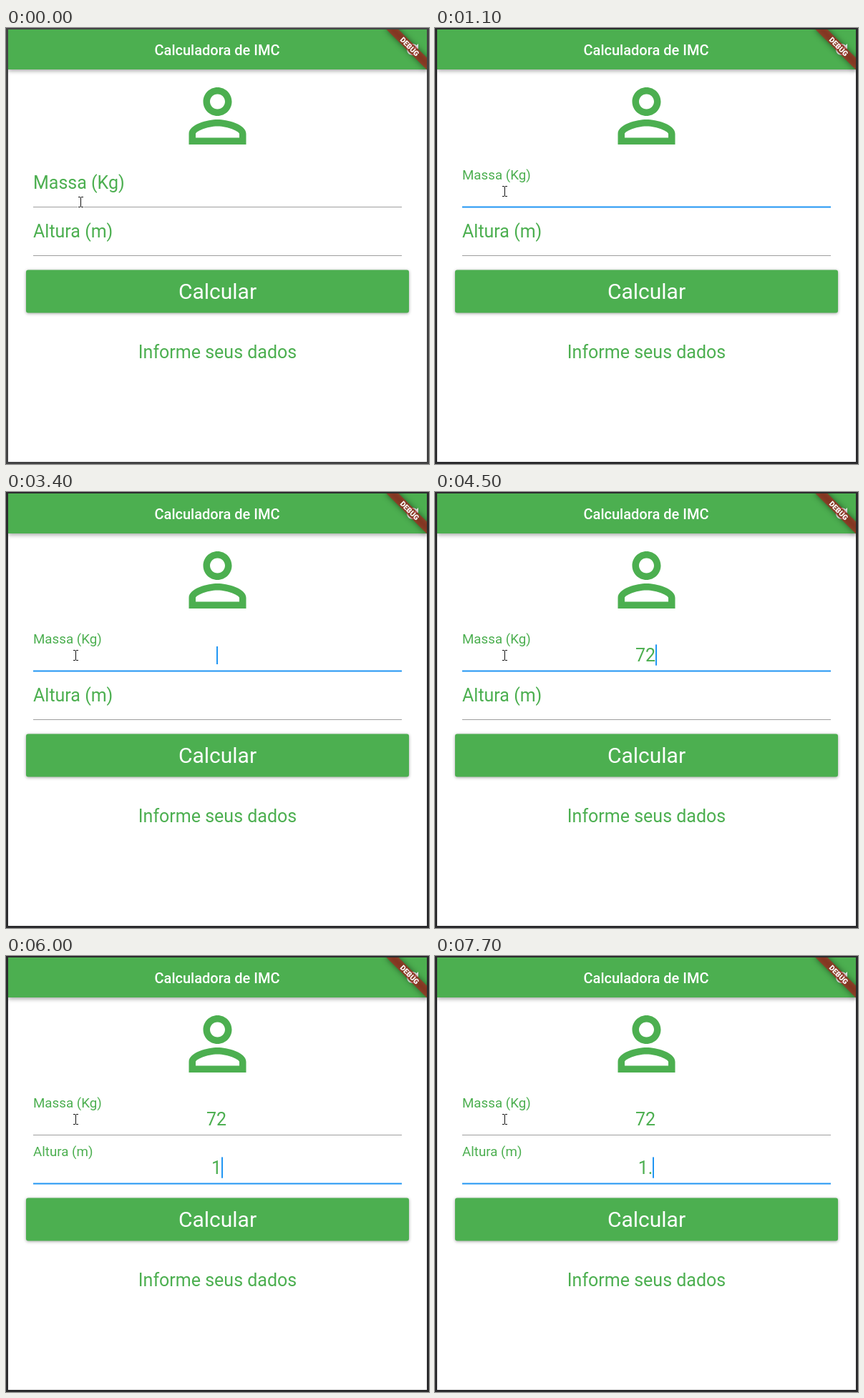
An HTML page with a canvas for the animation above (8 s loop, 591x610 px).

```html
<!DOCTYPE html>
<html lang="pt">
<head>
<meta charset="utf-8">
<title>Calculadora de IMC</title>
<style>
  html, body { margin: 0; width: 100%; height: 100%; overflow: hidden; background: #fff; }
  canvas { display: block; width: 591px; height: 610px; }
</style>
</head>
<body>
<canvas id="stage" width="591" height="610"></canvas>
<script>
const ctx = document.getElementById('stage').getContext('2d');
const LOOP = 8000, TICK = 100;
const GREEN = '#4caf50', BLUE = '#2196f3';
const MID = 295.5;

const person = new Path2D('M12 5.9c1.16 0 2.1.94 2.1 2.1s-.94 2.1-2.1 2.1S9.9 9.16 9.9 8s.94-2.1 2.1-2.1m0 9c2.97 0 6.1 1.46 6.1 2.1v1.1H5.9V17c0-.64 3.13-2.1 6.1-2.1M12 4C9.79 4 8 5.79 8 8s1.79 4 4 4 4-1.79 4-4-1.79-4-4-4zm0 9c-2.67 0-8 1.34-8 4v3h16v-3c0-2.66-5.33-4-8-4z');
const refresh = new Path2D('M17.65 6.35C16.2 4.9 14.21 4 12 4c-4.42 0-7.99 3.58-7.99 8s3.57 8 7.99 8c3.73 0 6.84-2.55 7.73-6h-2.08c-.82 2.33-3.04 4-5.65 4-3.31 0-6-2.69-6-6s2.69-6 6-6c1.66 0 3.14.69 4.22 1.78L13 11h7V4l-2.35 2.35z');

// Each entry: start time, text, caret shown
const massKeys = [
  [0, '', false], [600, '', true], [1100, '', false], [1600, '', true],
  [2100, '1', true], [2600, '1', false], [3000, '1', true], [3400, '', true],
  [3800, '7', true], [4200, '7', false], [4500, '72', true], [5000, '72', false]
];
const heightKeys = [
  [0, '', false], [5000, '', true], [5500, '', false], [6000, '1', true],
  [6300, '1,', true], [6800, '1,', false], [7300, '1', true], [7700, '1.', true]
];

const clamp = v => Math.min(1, Math.max(0, v));
const mix = (a, b, p) => a + (b - a) * p;
const stateAt = (keys, t) => keys.filter(k => k[0] <= t).pop();

// cubic-bezier(.4, 0, .2, 1)
function ease(x) {
  if (x <= 0 || x >= 1) return clamp(x);
  let lo = 0, hi = 1;
  for (let i = 0; i < 24; i++) {
    const s = (lo + hi) / 2, r = 1 - s;
    if (1.2 * r * r * s + 0.6 * r * s * s + s * s * s < x) lo = s; else hi = s;
  }
  return 3 * (1 - lo) * lo * lo + lo ** 3;
}
const focusAt = (t, start) => ease((t - start - 25) / 175);

function rect(x, y, w, h, color) {
  ctx.fillStyle = color;
  ctx.fillRect(x, y, w, h);
}

function text(str, x, y, size, color, align = 'center', weight = 400) {
  ctx.font = `${weight} ${size}px Roboto, sans-serif`;
  ctx.textAlign = align;
  ctx.fillStyle = color;
  ctx.fillText(str, x, y);
}

function icon(path, x, y, scale, color) {
  ctx.save();
  ctx.translate(x, y);
  ctx.scale(scale, scale);
  ctx.fillStyle = color;
  ctx.fill(path, 'evenodd');
  ctx.restore();
}

function raised(x, y, w, h, radius, blur, drop) {
  ctx.save();
  ctx.shadowColor = 'rgba(0,0,0,.36)';
  ctx.shadowBlur = blur;
  ctx.shadowOffsetY = drop;
  ctx.fillStyle = GREEN;
  ctx.beginPath();
  ctx.roundRect(x, y, w, h, radius);
  ctx.fill();
  ctx.restore();
}

function banner() {
  ctx.save();
  ctx.translate(588, 2);
  ctx.rotate(Math.PI / 4);
  ctx.filter = 'blur(4px)';
  rect(-40, 28, 80, 12, 'rgba(0,0,0,.5)');
  ctx.filter = 'none';
  rect(-40, 28, 80, 12, 'rgba(183,28,28,.627)');
  text('DEBUG', 0, 37.6, 10.2, '#fff', 'center', 900);
  ctx.restore();
}

// lift: how far the label floats; focus: how blue the underline is
function field(label, base, lift, focus, [, value, caret]) {
  text(label, 38, base - 13 * lift, mix(25, 18.75, lift), GREEN, 'left');

  const rgb = [33, 150, 243].map(c => Math.round(c * focus));
  const thick = 1 + focus;
  rect(38, base + 25.5 - thick / 2, 515, thick, `rgba(${rgb},${mix(0.38, 1, focus)})`);

  text(value, 294, base + 12, 25, GREEN);
  if (!caret) return;
  if (value) {
    const x = Math.round(294 + ctx.measureText(value).width / 2);
    rect(x, base - 11.6, 2, 29.3, BLUE);
  } else {
    rect(294, base - 9, 2, 25, BLUE);
  }
}

function pointer(t) {
  const p = clamp(t / 300);
  const x = Math.round(mix(104, 97, p)), y = Math.round(mix(243, 228, p));
  const parts = [[0, -6, 1, 13], [-3, -7, 3, 1], [1, -7, 3, 1], [-3, 7, 3, 1], [1, 7, 3, 1]];
  for (const [dx, dy, w, h] of parts) rect(x + dx - 1, y + dy - 1, w + 2, h + 2, 'rgba(255,255,255,.85)');
  for (const [dx, dy, w, h] of parts) rect(x + dx, y + dy, w, h, '#111');
}

function draw(t) {
  rect(0, 0, 591, 610, t < 500 ? '#434344' : '#2b2b2d');
  ctx.save();
  ctx.beginPath();
  ctx.rect(3, 2, 585, 605);
  ctx.clip();

  rect(3, 2, 585, 605, '#fff');
  raised(3, 2, 585, 56, 0, 6, 2);
  text('Calculadora de IMC', 295, 38, 20, '#fff', 'center', 500);
  icon(refresh, 556, 18, 1, '#fff');
  icon(person, 235.5, 63, 5, GREEN);

  const first = focusAt(t, 600), second = focusAt(t, 5000);
  field('Massa (Kg)', 225, first, first * (1 - second), stateAt(massKeys, t));
  field('Altura (m)', 293, second, second, stateAt(heightKeys, t));

  raised(28, 338.5, 535, 60, 3, 4, 1);
  text('Calcular', MID, 379, 30, '#fff');
  text('Informe seus dados', MID, 462, 25, GREEN);
  banner();
  pointer(t);
  ctx.restore();
}

const begin = performance.now();
function loop() {
  const t = (performance.now() - begin) % LOOP;
  draw(Math.floor(t / TICK) * TICK);
  requestAnimationFrame(loop);
}
loop();
</script>
</body>
</html>
```
